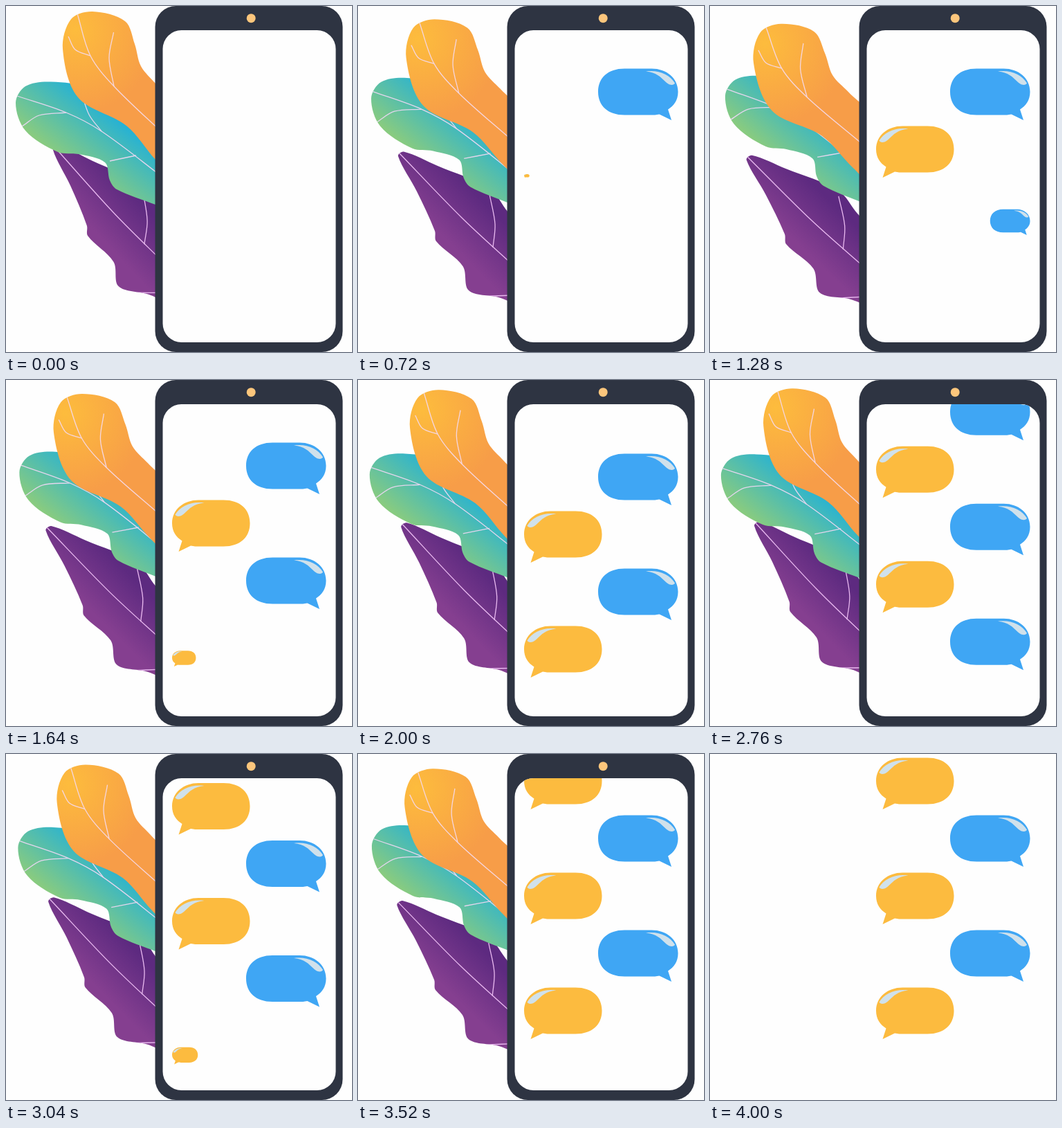
Animation of 500x500 px, one loop 4.04 s. Source, as an HTML page with a canvas:

```html
<!DOCTYPE html>
<html lang="en">
<head>
<meta charset="utf-8">
<title>Chat</title>
<style>
  html, body { margin: 0; width: 100%; height: 100%; overflow: hidden; background: #fefefe; }
  canvas { display: block; width: 500px; height: 500px; }
</style>
</head>
<body>
<canvas id="stage" width="500" height="500"></canvas>
<script>
const ctx = document.getElementById('stage').getContext('2d');
const LOOP = 4040, STEP = 40, PHONE_END = 4000;
const PAPER = '#fefefe', BLUE = '#3fa6f4', AMBER = '#fcbb3f';

// Smooth curve through a few x, y pairs, with handles scaled to the distance between them
function curve(flat, closed) {
  const n = flat.length / 2, path = new Path2D();
  const at = i => {
    i = closed ? (i + n) % n : Math.max(0, Math.min(n - 1, i));
    return [flat[2 * i], flat[2 * i + 1]];
  };
  const dist = (a, b) => Math.hypot(b[0] - a[0], b[1] - a[1]);
  const handle = (i, len) => {
    const a = at(i - 1), b = at(i), c = at(i + 1), k = len / (dist(a, b) + dist(b, c));
    return [b[0] + (c[0] - a[0]) * k, b[1] + (c[1] - a[1]) * k];
  };
  path.moveTo(...at(0));
  for (let i = 0; i < (closed ? n : n - 1); i++) {
    const len = dist(at(i), at(i + 1)) / 3;
    path.bezierCurveTo(...handle(i, len), ...handle(i + 1, -len), ...at(i + 1));
  }
  return path;
}

function shade(gradient, from, to) {
  gradient.addColorStop(0, from);
  gradient.addColorStop(1, to);
  return gradient;
}

// Each leaf swings by `turn` about `pivot`; its points show it at swing `rest`
function makeLeaf(pivot, turn, rest, fill, vein, outline, veins) {
  return { pivot, turn, rest, fill, vein, shape: curve(outline, true), veins: veins.map(v => curve(v, false)) };
}

const leaves = [
  makeLeaf([325, 480], -0.061, 0.6,
    shade(ctx.createLinearGradient(165, 265, 110, 320), '#5d2a80', '#853f90'), '#e9b9f0',
    [58, 217, 66, 210.5, 115, 231, 190, 264, 217, 298, 265, 350, 265, 440,
      203, 421, 160, 411, 151.5, 376, 113, 340, 111, 325, 85, 268],
    [[60, 213, 150, 306, 230, 380], [190, 272, 198, 315, 195, 349], [181, 419.5, 225, 418]]),
  makeLeaf([325, 378], 0.035, 0,
    shade(ctx.createLinearGradient(150, 156, 92, 229), '#27b2d3', '#88cb80'), '#e3d6ee',
    [14, 140, 28, 116, 65, 109.5, 120, 120, 265, 220, 265, 305, 216, 287,
      160, 265, 150, 252, 143, 226, 105, 214, 75, 211, 28, 180],
    [[16, 130, 87, 154, 138, 181, 230, 250], [23, 174, 48, 158, 87, 154],
      [108, 122, 120, 157, 138, 181], [150, 224, 188, 216]]),
  makeLeaf([403, 381], -0.066, 0,
    shade(ctx.createRadialGradient(100, 35, 0, 100, 35, 120), '#fdbc3d', '#f79d48'), '#f6d6df',
    [125, 8, 172, 22, 186, 55, 195, 87, 216, 112, 265, 170, 265, 270,
      216, 222, 174, 173, 104, 132, 82, 62, 94, 19],
    [[103, 11, 122, 72, 156, 116, 230, 187], [90, 44, 100, 63, 122, 72], [155.5, 38, 149, 75, 156, 116]])
];

// Bubble with the foot of its side at the origin, reaching left
function bubblePath(w) {
  return new Path2D(`M${38 - w} -74.5 H-38 C-17 -74.5 0 -61 0 -41 C0 -29 -6 -21 -14.5 -15.5
    L-9.5 0 L-27 -8.5 C-32 -7.5 -35 -7.5 -38 -7.5 H${38 - w}
    C${14 - w} -7.5 ${-w} -21 ${-w} -41 C${-w} -61 ${14 - w} -74.5 ${38 - w} -74.5 Z`);
}
const wide = bubblePath(115.5), narrow = bubblePath(112.5);
const gloss = new Path2D('M-46.5 -70.5 C-28 -73 -12 -66 -4.5 -53.5 C-6 -50 -12 -50 -17 -54.5 C-26 -63 -31 -69 -46.5 -70.5 Z');

const POP = 320, GAP = 422, FIRST = 276, ROW = 83, ON_SCREEN = 4;
const SCROLLS = [1838, 2692], DIP = 160, RISE = 320, SCROLL_POP = 242;

const clamp = p => Math.max(0, Math.min(1, p));
const smooth = p => (1 - Math.cos(Math.PI * clamp(p))) / 2;

// The list dips a little, then moves up by one row
function scrollAt(t) {
  return SCROLLS.reduce((y, s) =>
    y + 16 * smooth((t - s) / DIP) - (ROW + 17) * smooth((t - s - DIP) / RISE), 0);
}

// Later bubbles arrive together with a scroll
function popStart(i) {
  return i < ON_SCREEN ? FIRST + GAP * i : SCROLLS[i - ON_SCREEN] + SCROLL_POP;
}

function swingAt(t) {
  return t < 2400 ? 1 - Math.abs(t / 1200 - 1) : (t - 2400) / 1600;
}

function drawLeaf(leaf, swing) {
  const [x, y] = leaf.pivot;
  ctx.save();
  ctx.translate(x, y);
  ctx.rotate(leaf.turn * (swing - leaf.rest));
  ctx.translate(-x, -y);
  ctx.fillStyle = leaf.fill;
  ctx.fill(leaf.shape);
  ctx.clip(leaf.shape);
  ctx.strokeStyle = leaf.vein;
  ctx.lineWidth = 1.3;
  for (const v of leaf.veins) ctx.stroke(v);
  ctx.restore();
}

function fillBox(x, y, w, h, r, color) {
  ctx.fillStyle = color;
  ctx.beginPath();
  ctx.roundRect(x, y, w, h, r);
  ctx.fill();
}

function drawPhone() {
  fillBox(215.5, 0, 271, 500, 30, '#2e3442');
  fillBox(347.7, 11.2, 13, 13, 6.5, '#fcc67c');
  fillBox(226.5, 35, 250, 451, 27, PAPER);
}

function drawBubble(i, t, scroll) {
  const size = clamp((t - popStart(i)) / POP), right = i % 2 === 0;
  if (size === 0) return;
  ctx.save();
  ctx.translate(right ? 462.5 : 240, 165 + ROW * i + scroll);
  ctx.scale(right ? size : -size, size);
  ctx.fillStyle = right ? BLUE : AMBER;
  ctx.fill(right ? wide : narrow);
  ctx.fillStyle = '#d0e1eb';
  ctx.fill(gloss);
  ctx.restore();
}

function draw(t) {
  ctx.fillStyle = PAPER;
  ctx.fillRect(0, 0, 500, 500);
  ctx.save();
  if (t < PHONE_END) {
    for (const leaf of leaves) drawLeaf(leaf, swingAt(t));
    drawPhone();
    ctx.clip();
  }
  for (let i = 0; i < ON_SCREEN + SCROLLS.length; i++) drawBubble(i, t, scrollAt(t));
  ctx.restore();
}

const begin = performance.now();
function tick() {
  const t = (performance.now() - begin) % LOOP;
  draw(Math.floor(t / STEP) * STEP);
  requestAnimationFrame(tick);
}
tick();
</script>
</body>
</html>
```
